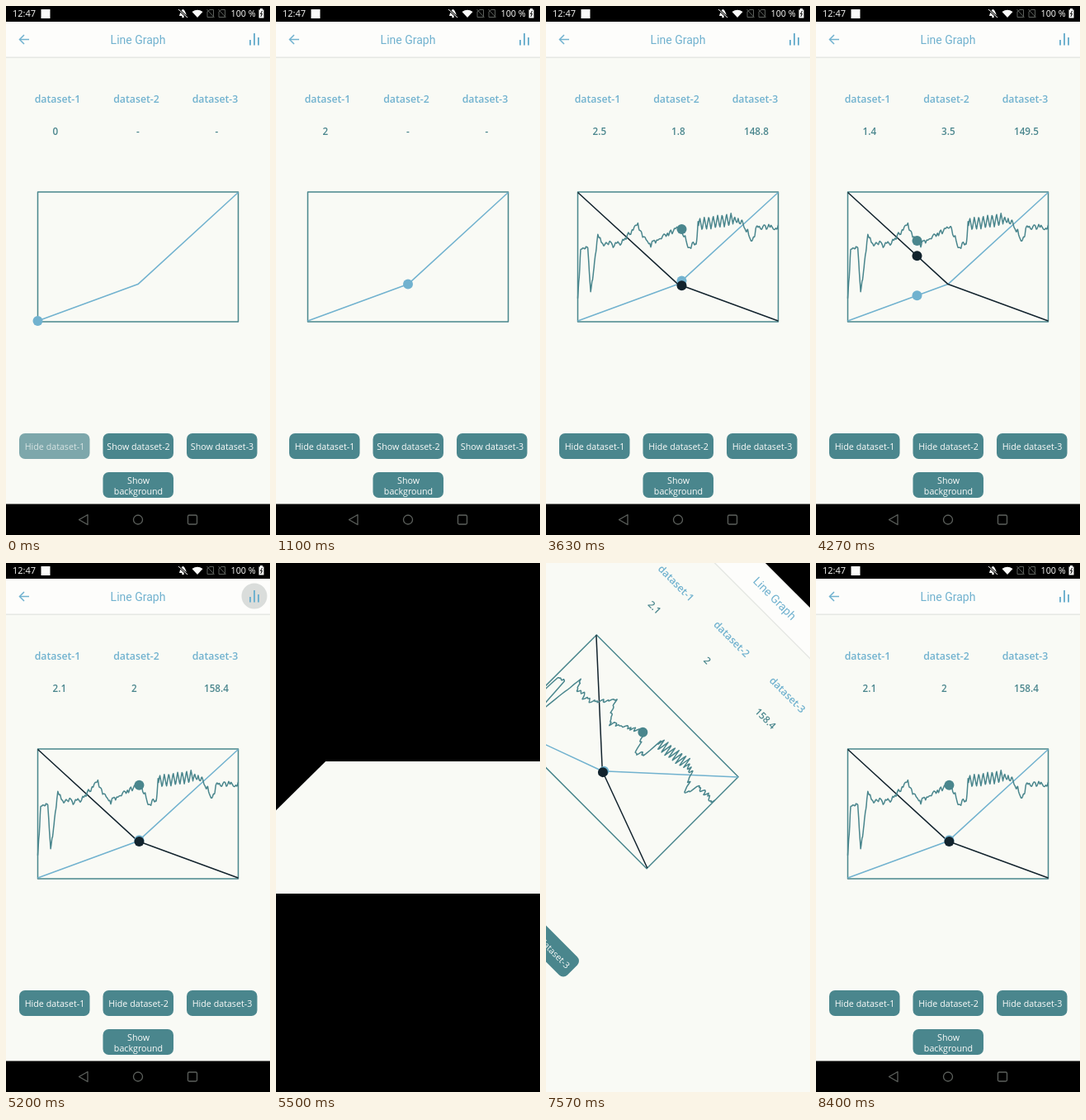
Write an HTML page with a canvas that moves like this. It is 320 px wide and 640 px high and loops after 8.43 s.

```html
<!DOCTYPE html>
<html lang="en">
<head>
<meta charset="utf-8">
<title>Line Graph</title>
<style>
html, body { margin: 0; width: 100%; height: 100%; overflow: hidden; background: #000; }
canvas { display: block; width: 320px; height: 640px; }
</style>
</head>
<body>
<canvas id="stage" width="320" height="640"></canvas>
<script>
const ctx = document.getElementById('stage').getContext('2d');
const LOOP = 8430;
const SANS = '"Open Sans", "Noto Sans", sans-serif';
const PAGE = '#f9faf5', HEAD = '#fdfdfb', BLUE = '#71b2cf', SLATE = '#4a868d',
      DARK = '#12232d', PALE = '#fcfcfa', GREY = '#5c605c';

const clamp = v => Math.max(0, Math.min(1, v));
const smooth = v => { v = clamp(v); return v * v * (3 - 2 * v); };
const span = (t, a, b) => clamp((t - a) / (b - a));
const random = n => { const v = Math.sin(n * 12.9898) * 43758.5453; return v - Math.floor(v); };

// piecewise value through [x, y] points
function through(points, x, ease = v => v) {
  const i = points.findIndex(q => x <= q[0]);
  if (i < 1) return points[i ? points.length - 1 : 0][1];
  const [x0, y0] = points[i - 1], [x1, y1] = points[i];
  return y0 + (y1 - y0) * ease((x - x0) / (x1 - x0));
}

// share of the chart width under the finger
const DRAG = [[430, 0], [870, .5], [1730, .5], [2100, .294], [3470, .294],
  [3860, .9], [4230, .34], [4600, .506]];
const WIDE_DRAG = [[6070, 0], [6470, .822], [6830, .965]];

// share of the chart width, share of its height from the top
const TREND = [[0, .84], [.015, .44], [.05, .43], [.065, .78], [.1, .33], [.13, .41],
  [.2, .4], [.3, .26], [.355, .42], [.515, .27], [.55, .415], [.59, .41],
  [.6, .25], [.77, .21], [.82, .23], [.87, .37], [.9, .26], [1, .28]];
const trend = p => through(TREND, p);

function pulse(p) {
  const saw = Math.abs((p * 45 + .1) % 1 * 2 - 1) - .5;
  if (p > .6 && p < .775) return trend(p) + saw * .1;
  if (p < .1) return trend(p) + (random(Math.floor(p * 180)) - .5) * .03;
  const n = p * 170, i = Math.floor(n);
  const noise = random(i) + (random(i + 1) - random(i)) * (n - i) - .5;
  return trend(p) + noise * .055;
}

const rise = p => p < .5 ? 4 * p : 2 + 10 * (p - .5);
const SETS = [
  { color: BLUE, at: p => 1 - rise(p) / 7, value: rise, tap: -200, left: 56.5 },
  { color: DARK, at: p => 1 - rise(1 - p) / 7, value: p => rise(1 - p), tap: 1100, left: 152 },
  { color: SLATE, at: pulse, value: p => 158.4 - 70 * (trend(p) - trend(.506)), tap: 2970, left: 240 }
];
const TAP = 240;
const shown = (s, t) => t >= s.tap + TAP / 2;

function rect(x, y, w, h, color) {
  ctx.fillStyle = color;
  ctx.fillRect(x, y, w, h);
}
function disc(x, y, r, color) {
  ctx.fillStyle = color;
  ctx.beginPath();
  ctx.arc(x, y, r, 0, 7);
  ctx.fill();
}
function path(points, color, width, close) {
  ctx.beginPath();
  points.forEach(([x, y]) => ctx.lineTo(x, y));
  if (close) ctx.closePath();
  ctx.strokeStyle = color;
  ctx.lineWidth = width;
  ctx.stroke();
}
function text(str, x, y, font, color, align = 'center') {
  ctx.font = font;
  ctx.fillStyle = color;
  ctx.textAlign = align;
  ctx.fillText(str, x, y);
}

function statusBar(width) {
  text('12:47', 8, 13, '11px ' + SANS, PALE, 'left');
  rect(42.5, 4, 11, 11, PALE);
  ctx.save();
  ctx.translate(width - 320, 0);
  ctx.fillStyle = PALE;
  ctx.beginPath();
  ctx.moveTo(210, 12);
  ctx.quadraticCurveTo(214.5, -4, 219, 12);
  ctx.moveTo(232, 14);
  ctx.lineTo(225.5, 7);
  ctx.quadraticCurveTo(232, 2.5, 238.5, 7);
  ctx.fill();
  disc(214.5, 13, 1.3, PALE);
  path([[209, 4], [220, 14]], '#000', 2.4);
  path([[209, 4], [220, 14]], PALE, 1);
  for (const x of [244, 258]) {
    path([[x, 13.5], [x, 7], [x + 3, 4.5], [x + 7.5, 4.5], [x + 7.5, 13.5]], GREY, 1, true);
    path([[x - .5, 4], [x + 8.5, 14]], GREY, 1);
  }
  text('100 %', 272.5, 13, '10.8px ' + SANS, PALE, 'left');
  rect(306.5, 4.5, 6, 10, PALE);
  rect(308, 3, 3, 2, PALE);
  path([[310.5, 6], [308.5, 9.5], [310.5, 9.5], [308.7, 13]], '#000', 1);
  ctx.restore();
}

function navIcon(kind, x, y) {
  if (kind === 'back') return path([[x - 5.5, y], [x + 5, y - 6], [x + 5, y + 6]], GREY, 1.3, true);
  ctx.beginPath();
  ctx.roundRect(x - 5.5, y - 5.5, 11, 11, kind === 'home' ? 5.5 : 1.5);
  ctx.strokeStyle = GREY;
  ctx.lineWidth = 1.3;
  ctx.stroke();
}

function chart(x, y, w, h, t, p, line) {
  ctx.lineJoin = 'round';
  path([[x, y], [x + w, y], [x + w, y + h], [x, y + h]], SLATE, line, true);
  const live = SETS.filter(s => shown(s, t));
  const spot = (s, q) => [x + w * q, y + .5 + (h - 1.5) * s.at(q)];
  for (const s of live) {
    const steps = s.at === pulse ? 420 : 2;
    const points = Array.from({ length: steps + 1 }, (_, i) => spot(s, i / steps));
    path(points, s.color, line);
  }
  for (const s of [live[0], live[2], live[1]])
    if (s) disc(...spot(s, p), 6, s.color);
}

function button(x, y, lines, alpha = 1) {
  ctx.save();
  ctx.globalAlpha = alpha;
  ctx.fillStyle = SLATE;
  ctx.beginPath();
  ctx.roundRect(x, y, 85.5, 31, 7);
  ctx.fill();
  lines.forEach((s, i) => {
    const base = lines.length > 1 ? 13.5 + i * 13 : 20;
    text(s, x + 43, y + base, '10.7px ' + SANS, PALE);
  });
  ctx.restore();
}

function header(t) {
  rect(0, 19, 320, 43, HEAD);
  rect(0, 61.5, 320, 1.5, '#e6e8e4');
  if (t >= 5000 && t < 5330) {
    ctx.globalAlpha = span(t, 4980, 5120);
    disc(301, 40, 6 + 9.5 * smooth(span(t, 5000, 5150)), '#dadddb');
    ctx.globalAlpha = 1;
  }
  path([[28, 40.5], [17, 40.5]], BLUE, 1.5);
  path([[22, 35], [16.5, 40.5], [22, 46]], BLUE, 1.5);
  text('Line Graph', 160, 46, '14px Roboto, sans-serif', BLUE);
  for (const [x, y] of [[296, 41], [301, 33], [306, 38]]) rect(x - 1, y, 2, 47.5 - y, BLUE);
}

function portrait(t) {
  rect(0, -400, 720, 419, '#000');
  header(t);
  const ahead = through(DRAG, t + 14, smooth);
  SETS.forEach((s, i) => {
    const on = shown(s, t), name = 'dataset-' + (i + 1), font = '600 11.7px ' + SANS;
    text(name, 62.5 + 95.5 * i, 117, '600 12.3px ' + SANS, BLUE);
    if (on) text(String(+s.value(ahead).toFixed(1)), s.left, 156, font, SLATE, 'left');
    else text('-', 64.5 + 95.5 * i, 156, font, SLATE);
    const press = Math.sin(Math.PI * span(t, s.tap, s.tap + TAP));
    button(16 + 101.5 * i, 517, [(on ? 'Hide ' : 'Show ') + name], 1 - .6 * press);
  });
  button(117.5, 564, ['Show', 'background']);
  chart(38.5, 225, 243, 157, t, through(DRAG, t, smooth), 1.5);
  statusBar(320);
  rect(0, 602.5, 320, 400, '#000');
  ['back', 'home', 'recent'].forEach((kind, i) => navIcon(kind, 94 + 66 * i, 621.5));
}

// drawn on a 640 by 320 screen
function landscape(t) {
  rect(0, -400, 640, 418, '#000');
  statusBar(602);
  if (t >= 5930) chart(26.5, 36.5, 550, 265, t, through(WIDE_DRAG, t, smooth), 1.6);
  rect(602, 0, 400, 320, '#000');
  ['recent', 'home', 'back'].forEach((kind, i) => navIcon(kind, 621, 94 + 66 * i));
}

// quarter turn about the centre that slides into place as k goes from 1 to 0
function turn(w, h, k, dir) {
  ctx.translate(w / 2 - 160 * k, h / 2 - 160 * k);
  ctx.rotate(dir * k * Math.PI / 2);
  ctx.translate(-w / 2, -h / 2);
}

function draw(t) {
  const wide = t >= 5330 && t < 7235;
  rect(0, 0, 320, 640, wide ? '#000' : PAGE);
  ctx.save();
  if (wide) {
    ctx.beginPath();
    ctx.rect(0, 240, 320, 160);
    ctx.clip();
    rect(0, 240, 320, 160, PAGE);
    ctx.translate(0, 240);
    ctx.scale(.5, .5);
    turn(640, 320, 1 - smooth(span(t, 5330, 5670)), -1);
    landscape(t);
  } else {
    if (t >= 7235) turn(320, 640, 1 - smooth(span(t, 7236, 7906)), 1);
    portrait(t);
  }
  ctx.restore();
}

function tick() {
  draw(performance.now() % LOOP);
  requestAnimationFrame(tick);
}
tick();
</script>
</body>
</html>
```
